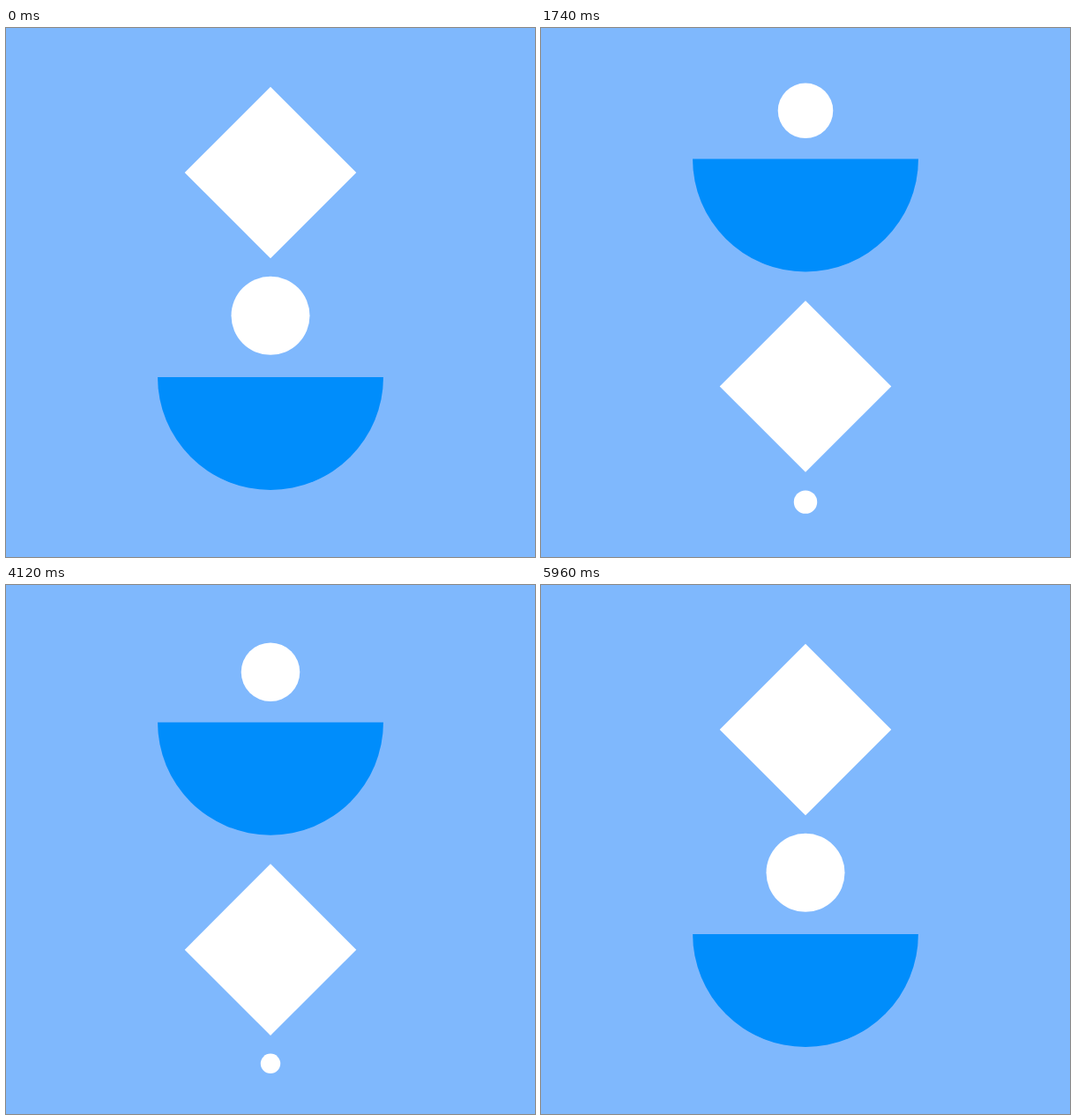
These frames come from a looping animation (600 by 600 pixels, 6 s). An HTML page:

```html
<!DOCTYPE html>
<html lang="en">
<head>
<meta charset="utf-8">
<title>Rising shapes</title>
<style>
  html, body { margin: 0; width: 100%; height: 100%; overflow: hidden; background: #7fb8fd; }
  svg { display: block; width: 100%; height: 100%; }
</style>
</head>
<body>
<svg viewBox="0 0 600 600"></svg>
<script>
const LOOP = 6000;
const LEG = 1200;
const CYCLE = 490;
const SHIFTS = [0, 200, 360, CYCLE];        // scroll offset at each stop
const ROUTE = [0, 1, 2, 1, 2, 3];           // stops visited during one loop

// y: resting position; exit / enter: where the shape vanishes and appears
const SHAPES = [
  { d: 'M0-97.3 97.3 0 0 97.3-97.3 0Z', fill: '#fff', y: 164, exit: 62, enter: 556 },
  { d: 'M-44.5 0a44.5 44.5 0 1 1 89 0a44.5 44.5 0 1 1-89 0Z', fill: '#fff', y: 326.3, exit: 17, enter: 572 },
  { d: 'M-128 0H128A128 128 0 0 1-128 0Z', fill: '#008dfb', y: 396, exit: 22, enter: 538 }
];

const svg = document.querySelector('svg');
const lerp = (a, b, p) => a + (b - a) * p;
const clamp = v => Math.min(1, Math.max(0, v));

function addPath({ d, fill }) {
  const path = document.createElementNS('http://www.w3.org/2000/svg', 'path');
  path.setAttribute('d', d);
  path.setAttribute('fill', fill);
  svg.appendChild(path);
  return path;
}

for (const shape of SHAPES) {
  shape.leaving = addPath(shape);
  shape.entering = addPath(shape);
}

// cubic-bezier(.8, 0, .2, 1), solved by bisection
function ease(x) {
  let lo = 0, hi = 1;
  for (let i = 0; i < 30; i++) {
    const u = (lo + hi) / 2, v = 1 - u;
    if (2.4 * u * v * v + 0.6 * u * u * v + u * u * u < x) lo = u;
    else hi = u;
  }
  return lo * lo * (3 - 2 * lo);
}

function place(path, y, scale) {
  path.setAttribute('visibility', scale > 0 ? 'visible' : 'hidden');
  path.setAttribute('transform', `translate(300 ${y}) scale(${scale})`);
}

function draw(time) {
  const t = time % LOOP;
  const leg = Math.floor(t / LEG);
  const progress = lerp(ROUTE[leg], ROUTE[leg + 1], ease(t % LEG / LEG));
  const stop = Math.min(2, Math.floor(progress));
  const shift = lerp(SHIFTS[stop], SHIFTS[stop + 1], progress - stop);

  SHAPES.forEach(({ y, exit, enter, leaving, entering }, i) => {
    const p = clamp(progress - i);
    place(leaving, p > 0 ? lerp(y - SHIFTS[i], exit, p) : y - shift, 1 - p);
    place(entering, p < 1 ? lerp(enter, y + CYCLE - SHIFTS[i + 1], p) : y + CYCLE - shift, p);
  });
}

const start = performance.now();
function tick() {
  draw(performance.now() - start);
  requestAnimationFrame(tick);
}
tick();
</script>
</body>
</html>
```
